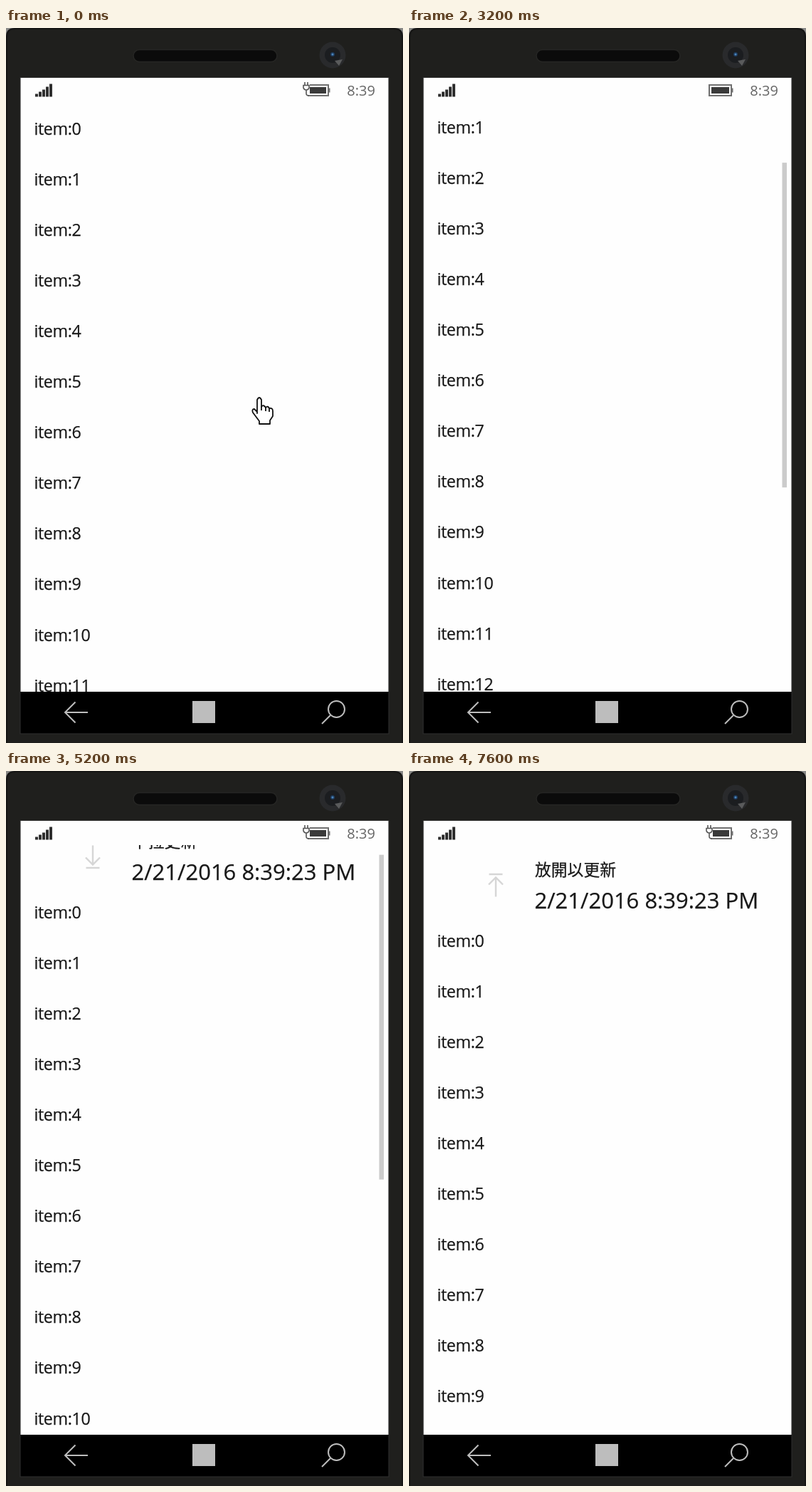
Recreate the animation shown at these times as an HTML page. Size 558 by 1004 pixels, loop 8 s.

```html
<!DOCTYPE html>
<html lang="en">
<head>
<meta charset="utf-8">
<title>Pull to refresh</title>
<style>
  html, body { margin: 0; width: 100%; height: 100%; overflow: hidden; background: #1e1e1c; }
  svg { display: block; width: 100vw; height: 100vh; }
  text { font-family: "Open Sans", "Noto Sans", sans-serif; fill: #181818; stroke: #181818; stroke-width: .25px; }
  .item { font-size: 23.2px; letter-spacing: -.35px; }
  .date { font-size: 31px; }
  .hint { font: 22.8px "Noto Sans CJK TC", "Noto Sans CJK SC", "Noto Sans CJK", "Noto Sans CJK JP", sans-serif; }
  .clock { font-size: 20px; fill: #666; stroke: none; text-anchor: end; }
  .line { fill: none; stroke-width: 2; }
</style>
</head>
<body>
<svg viewBox="0 0 558 1004" preserveAspectRatio="none">
  <defs>
    <clipPath id="view"><rect x="20.5" y="104" width="517" height="828"/></clipPath>
  </defs>

  <!-- phone body -->
  <rect width="558" height="1004" fill="#8a8a88"/>
  <path d="M0 1004V12Q0 0 12 0H546Q558 0 558 12V1004Z" fill="#151514"/>
  <path d="M2 1004V13Q2 2 13 2H545Q556 2 556 13V1004Z" fill="#1f1f1d"/>
  <rect x="179" y="30.5" width="202" height="17" rx="8.5" fill="#0b0b0b" stroke="#262624" stroke-width="1.5"/>
  <circle cx="459" cy="38" r="18.5" fill="#292a2c"/>
  <circle cx="459" cy="38" r="11" fill="#1b1d20"/>
  <path d="M462 46L473 44L468 53Z" fill="#5a5b5c"/>
  <circle cx="459" cy="37" r="3" fill="#1f3c5e"/>
  <circle cx="459" cy="37" r="1.5" fill="#4c86bd"/>
  <rect x="20" y="69.5" width="518" height="921.5" fill="#000" stroke="#313130"/>
  <rect x="20.5" y="70" width="517" height="862" fill="#fefefe"/>

  <!-- list -->
  <g clip-path="url(#view)">
    <g id="list">
      <g id="arrow" class="line" stroke="#d6d6d6">
        <path d="M0-16V11M-10 1L0 11L10 1M-9.5 15.5H9.5" stroke-width="2.4"/>
      </g>
      <text id="hint" class="hint" x="177" y="50"></text>
      <text class="date" x="176.5" y="96">2/21/2016 8:39:23 PM</text>
    </g>
    <rect id="bar" x="524.5" width="6.5" height="456" fill="#cbcbcb"/>
  </g>

  <!-- status bar -->
  <path d="M41 96.5v-4h4v4zM46 96.5v-7h4v7zM51 96.5v-10h4v10zM56 96.5v-14h4v14zM61 96.5v-18h4v18z" fill="#2f2f2f"/>
  <g id="battery">
    <rect class="line" x="422" y="80" width="31" height="15" stroke="#707070"/>
    <rect x="425" y="83" width="25" height="9" fill="#3a3a3a"/>
    <rect x="453" y="84.5" width="2.5" height="6" fill="#707070"/>
  </g>
  <g id="charging">
    <path class="line" d="M427 80H453V95H424" stroke="#707070"/>
    <rect x="427" y="83" width="23" height="9" fill="#3a3a3a"/>
    <rect x="453" y="84.5" width="2.5" height="6" fill="#707070"/>
    <path class="line" d="M420 76V80M424 76V80M418 80.5H426V84Q425 87 422 87Q419 87 418 84ZM422 87V92Q422 95 426 95" stroke="#555" style="stroke-width:1.6"/>
  </g>
  <text class="clock" x="519" y="94.5">8:39</text>

  <!-- navigation -->
  <g class="line" stroke="#bdbdbd">
    <path d="M115 961H83M97.5 946.5L83 961L97.5 975.5"/>
    <circle cx="464.5" cy="956.5" r="11.5"/>
    <path d="M456 965L444 977"/>
  </g>
  <rect x="262" y="945" width="32" height="31" fill="#bdbdbd"/>

  <g id="cursor" stroke="#111" stroke-width="1.8" stroke-linejoin="round" fill="#fff">
    <path d="M353 541V522Q356 516 359 522V532Q362 528 365 533Q368 530 370 534Q375 533 375 538V545L371 551V556H356V552L347 540Q345 535 349 535L353 539Z"/>
    <path d="M359 531V537M365 533V538M370 534V539"/>
  </g>
</svg>
<script>
  const LOOP = 8000, STEP = 200, ROW = 71.1, FLIP_AT = 88;
  // [time, list offset in px]
  const path = [
    [0, 0], [800, 0], [1000, -25], [1400, -190], [1800, -285], [2000, -285],
    [2200, -257], [3200, -73], [4000, 9], [4400, 47], [4800, 48], [5200, 57],
    [6000, 71], [6200, 71], [7400, 96], [7600, 97], [LOOP, 97]
  ];
  const el = id => document.getElementById(id);
  const [list, arrow, hint, bar, battery, charging, cursor] =
    ['list', 'arrow', 'hint', 'bar', 'battery', 'charging', 'cursor'].map(el);
  const show = (node, on) => node.setAttribute('visibility', on ? 'visible' : 'hidden');

  for (let i = 0; i < 20; i++) {
    const row = document.createElementNS(list.namespaceURI, 'text');
    row.setAttribute('class', 'item');
    row.setAttribute('x', 39.5);
    row.setAttribute('y', 149.5 + i * ROW);
    row.textContent = 'item:' + i;
    list.append(row);
  }

  function offsetAt(t) {
    const i = path.findIndex(([time]) => time > t);
    const [t0, y0] = path[i - 1], [t1, y1] = path[i];
    return y0 + (y1 - y0) * (t - t0) / (t1 - t0);
  }

  function draw(t) {
    const y = offsetAt(t);
    const release = y > FLIP_AT;
    const plugged = Math.floor((t + 1320) / 1460) % 2 === 0;
    list.setAttribute('transform', `translate(0 ${y})`);
    arrow.setAttribute('transform', `translate(122 63.5) rotate(${release ? 180 : 0})`);
    hint.textContent = release ? '放開以更新' : '下拉更新';
    bar.setAttribute('y', Math.max(105, 149 - .55 * y));
    show(bar, t >= 1000 && t < 7600);
    show(battery, !plugged);
    show(charging, plugged);
    show(cursor, t < 400);
  }

  const start = performance.now();
  function tick() {
    const t = (performance.now() - start) % LOOP;
    draw(Math.floor(t / STEP) * STEP);
    requestAnimationFrame(tick);
  }
  tick();
</script>
</body>
</html>
```
